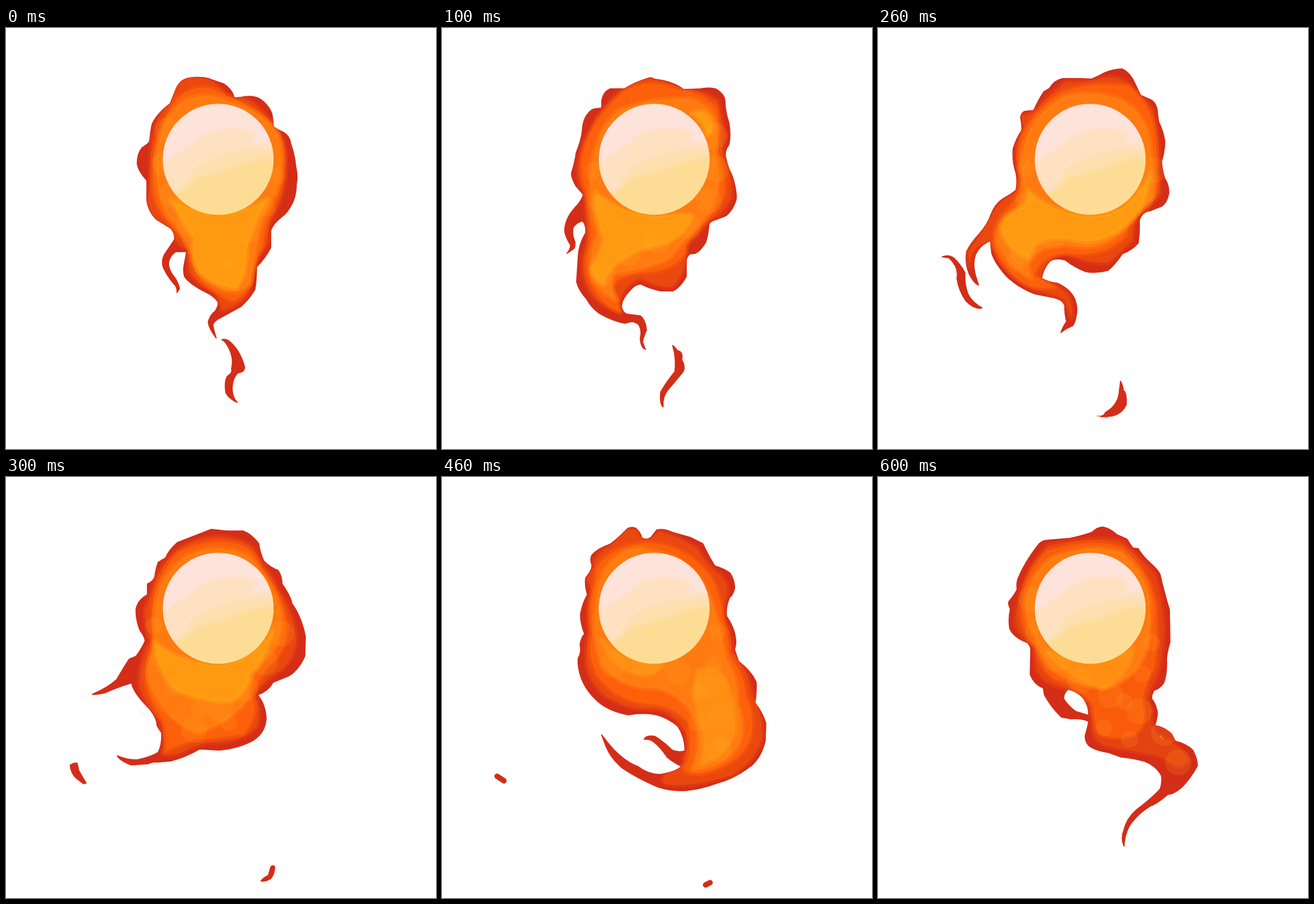
An HTML page without scripts for the animation above (700 ms loop, 757x740 px).

```html
<!DOCTYPE html>
<html lang="en">
<head>
<meta charset="utf-8">
<title>Fireball</title>
<style>
html, body { margin: 0; width: 100%; height: 100%; overflow: hidden; background: #fff; }
svg { display: block; width: 100%; height: 100%; }
path { fill-rule: evenodd; clip-rule: evenodd; }
.pose { visibility: hidden; animation: show .7s step-end calc(var(--i) * .1s) infinite; }
@keyframes show {
  0% { visibility: visible; }
  14.2857%, 100% { visibility: hidden; }
}
.rim { fill: #d42d18; stroke: #d42d18; stroke-width: 1.8; stroke-linejoin: round; }
.ember { fill: none; stroke: #d42d18; stroke-width: 9.5; stroke-linecap: round; }
.heat path { stroke-linejoin: round; stroke-width: 9; stroke-opacity: .4; }
.a { fill: #e9480f; stroke: #e9480f; }
.b { fill: #fd600a; stroke: #fd600a; }
.c { fill: #ff7f12; stroke: #ff7f12; fill-opacity: .9; }
.d { fill: #ffa012; stroke: #ffa012; fill-opacity: .8; }
.late .d { fill: #ff9314; stroke: #ff9314; }
.heat .dab { fill: none; stroke: #ffa520; stroke-width: 46; stroke-linecap: round; stroke-dasharray: 0 58; stroke-opacity: .16; }
.heat .dab + .dab { stroke-width: 30; stroke-dashoffset: 27; }
</style>
</head>
<body>
<svg viewBox="0 0 757 740" preserveAspectRatio="none">
<defs>
  <filter id="soft" x="-20%" y="-20%" width="140%" height="140%"><feGaussianBlur stdDeviation="3"/></filter>
  <clipPath id="disc"><circle cx="373.5" cy="230.7" r="97.5"/></clipPath>

  <path id="o0" d="M299 108Q306 91 322 88Q340 85 357 89L383 98Q398 107 402 123L413 122Q436 117 449 126Q467 140 469 156L471 174Q478 179 488 183Q500 190 501 203Q508 221 510 243Q514 261 511 275Q511 292 505 306Q496 325 484 333Q470 344 466 356L466 386Q456 405 441 420Q441 445 438 460Q427 478 413 490L378 509Q366 515 364 522Q366 533 370 545Q357 528 356 517Q359 505 368 498Q375 488 373 481Q366 471 351 464Q325 451 315 438Q312 432 313 420L318 393L299 393Q287 401 286 414Q286 426 298 440Q306 454 305 459L301 465Q302 455 295 449Q284 436 277 421Q273 410 279 398Q292 379 297 371Q297 360 290 352L264 336Q250 321 248 303L248 268Q233 252 231 238Q231 220 240 210Q251 204 253 198Q254 185 257 170Q264 152 289 133Z"/>
  <path id="o1" d="M363 88Q369 86 374 90Q392 92 408 98Q419 103 425 108Q440 108 455 107Q470 104 482 107Q498 117 498 128Q499 150 505 166Q509 190 505 205Q496 218 500 230Q503 245 511 260Q519 285 518 300Q514 318 500 330L482 337Q471 340 470 345Q468 367 464 377Q455 392 446 396L436 397Q431 402 430 408L430 437Q420 455 407 462L385 462Q365 458 350 450Q342 450 335 457Q316 475 316 490Q318 500 325 503L349 506Q358 512 360 531Q354 545 353 552L358 565Q350 562 349 545Q353 530 345 520Q335 514 330 517L322 519Q300 515 276 501Q262 490 255 477Q240 460 237 446L240 400Q241 380 253 360Q254 345 247 339Q238 341 231 350Q228 362 234 376Q235 388 229 390L220 396Q227 388 226 381Q216 365 216 355Q217 335 233 317Q245 305 249 293L236 278Q227 262 228 255Q235 232 236 220Q246 195 247 180Q248 165 253 156Q262 142 270 142L280 141Q282 138 281 130Q283 112 296 107L321 107Q340 95 363 88Z"/>
  <path id="o2" d="M375 90Q390 84 398 79Q415 72 430 72Q440 76 448 89Q456 105 462 118L482 127Q492 135 492 150L494 165Q502 180 505 200Q504 220 499 235Q500 250 505 265Q512 275 512 290Q510 305 500 313L480 321Q465 322 460 338Q461 360 458 378Q448 390 430 397Q418 415 405 426Q385 432 365 428Q345 420 330 408Q312 403 302 410Q290 425 288 440Q300 447 317 449Q340 460 347 478Q352 492 349 505Q347 518 343 523L331 529L322 535Q326 524 332 516Q328 500 329 488Q325 477 310 474L275 467Q245 455 225 435Q205 412 200 395L198 374Q178 382 171 400Q166 415 172 436L177 452Q168 448 160 431Q153 412 156 393Q163 378 178 362Q193 345 198 330Q205 310 220 300Q235 292 243 285Q246 270 243 255Q236 235 238 212Q243 195 253 180Q254 170 251 158Q252 146 263 146L274 145Q283 125 292 112L302 106Q310 92 325 89L360 89Z"/>
  <path id="o3" d="M361 92L388 95L418 95Q432 100 445 117Q447 133 454 148Q466 160 479 164Q486 175 486 188Q502 211 503 222Q520 245 527 280L526 315Q515 340 497 350L470 361Q462 376 443 383Q457 400 458 425Q456 450 435 463Q410 477 375 480L341 478Q315 493 290 499L267 501Q258 500 250 504L220 506Q200 498 196 490Q215 498 232 497Q255 492 268 484Q275 470 274 450L266 437Q266 425 253 408Q240 395 235 388Q224 375 221 362Q195 370 175 379Q160 383 152 382Q180 370 195 356Q210 330 217 320L229 315Q240 300 245 288Q244 280 236 270Q228 250 229 232Q232 216 249 207L249 188Q260 183 262 175Q264 160 268 150L281 142Q287 128 302 115Q335 102 361 92Z"/>
  <path id="o4" d="M326 91Q333 87 341 90Q349 97 352 107Q359 112 368 106L378 93Q390 90 405 97L437 106L459 117Q470 140 480 156Q500 162 508 170Q516 185 515 196Q512 208 506 212Q499 230 501 245Q515 265 517 285Q518 295 515 303Q519 315 522 324Q545 342 553 360Q554 380 551 397Q565 415 570 433L569 464Q562 492 545 507Q515 530 485 538Q455 549 430 551Q405 553 380 545Q345 530 318 512Q297 495 288 472L281 453Q292 468 303 480Q325 502 345 509Q362 522 382 523Q408 520 422 509Q405 500 396 492Q385 475 372 465Q365 460 356 461Q360 453 375 456Q390 465 405 480Q418 485 428 481Q427 455 415 438Q400 425 378 418Q355 413 328 418Q295 412 275 395Q252 375 244 350Q238 330 240 318Q246 308 243 295Q245 282 251 276Q243 255 244 240Q248 220 256 207Q251 190 253 177Q264 165 264 155Q260 145 264 137Q275 125 296 118Q310 108 326 91Z"/>
  <path id="o5" d="M323 104L366 104Q380 96 397 96Q425 97 447 106Q470 124 490 145L495 159Q506 164 508 178L507 195Q520 210 522 240L526 303Q545 335 583 376Q605 402 615 432L616 462Q610 495 603 507Q580 535 556 555Q525 575 508 600Q497 620 497 632L503 627Q498 640 500 655L510 679Q495 670 485 652Q480 640 483 625Q487 605 502 583Q520 555 527 530Q533 510 532 488Q510 500 497 510Q486 518 486 528L488 545Q479 535 479 520Q482 508 488 500Q488 488 493 475Q500 462 503 452Q495 435 480 428Q465 418 452 417L435 419Q410 416 388 407Q370 411 350 404Q320 392 291 382L285 368Q265 352 260 335Q256 315 262 297Q251 285 248 277L249 266Q242 245 245 228Q250 215 250 205Q256 192 264 180Q273 172 275 155Q283 135 290 128L304 124Q315 117 323 104Z"/>
  <path id="o6" d="M377 97Q385 89 395 88Q408 90 420 101L438 109Q445 120 449 125L458 126Q465 138 478 150Q495 165 497 173Q503 200 513 233L514 290Q508 310 508 322Q509 345 503 362Q496 372 486 375Q481 382 482 390Q491 402 492 416Q490 430 487 437Q505 440 517 452L523 464Q545 470 554 480Q563 497 562 508Q550 530 535 545Q520 558 510 558Q490 575 480 578Q460 590 447 607Q435 622 433 649Q427 635 433 620Q438 600 455 585Q485 562 497 548Q501 535 499 525Q490 508 470 500Q450 494 427 492L405 484Q380 480 370 471Q362 460 366 450Q369 440 371 430Q362 424 340 425L323 422Q305 405 293 383L291 371Q275 365 268 347L269 303Q268 296 263 291Q240 283 232 267Q229 250 233 232Q228 222 231 218Q242 205 245 197Q243 185 248 175Q260 147 283 118Q290 111 300 111L337 108Q360 103 377 97ZM335 373Q326 380 327 390Q335 403 348 412L371 419Q371 400 360 387Q350 377 335 373Z"/>

  <clipPath id="k0"><use href="#o0"/></clipPath>
  <clipPath id="k1"><use href="#o1"/></clipPath>
  <clipPath id="k2"><use href="#o2"/></clipPath>
  <clipPath id="k3"><use href="#o3"/></clipPath>
  <clipPath id="k4"><use href="#o4"/></clipPath>
  <clipPath id="k5"><use href="#o5"/></clipPath>
  <clipPath id="k6"><use href="#o6"/></clipPath>
</defs>

<g class="pose" style="--i:0">
  <use href="#o0" class="rim"/>
  <path class="rim" d="M380 548Q385 546 391 549Q412 565 420 596Q420 605 408 606Q398 616 398 635Q399 650 407 658Q393 652 387 641Q384 620 390 612Q400 606 397 599Q402 580 391 560Q385 549 380 548Z"/>
  <g class="heat" clip-path="url(#k0)">
    <path class="a" d="M299 108Q306 91 322 88Q345 85 365 95Q385 110 390 123Q405 130 413 122Q436 128 455 150L468 168Q487 185 492 215Q496 260 484 300Q475 325 463 345L460 380Q442 400 433 420Q437 450 422 472Q405 492 380 496Q378 485 370 466Q333 448 322 428L320 390Q300 380 298 368L290 352L264 336Q248 315 250 303L254 268Q252 225 259 190Q262 155 289 133Z"/>
    <path class="b" d="M300 125Q340 90 380 115Q420 130 450 155Q483 175 489 220Q491 270 475 305Q458 335 452 385Q437 410 432 440Q425 468 400 480Q372 468 347 448Q323 425 324 390Q312 365 290 345Q258 315 258 270Q254 190 300 125Z"/>
    <path class="c" d="M310 130Q345 110 380 125Q450 140 480 190Q492 240 475 290Q450 330 442 380Q435 420 430 450Q410 470 380 460Q335 440 326 395Q310 360 285 330Q262 290 264 230Q270 160 310 130Z"/>
    <path class="d" d="M290 300Q370 350 460 300Q440 340 425 380Q425 430 405 458Q370 455 340 430Q325 400 330 370Q310 340 290 300Z"/>
    <path class="dab" d="M285 180Q260 290 345 365T405 465"/><path class="dab" d="M480 230Q470 330 420 370T390 450"/>
  </g>
</g>

<g class="pose" style="--i:1">
  <use href="#o1" class="rim"/>
  <path class="rim" d="M406 558Q412 563 414 567Q425 569 422 583Q430 598 423 606Q410 622 397 637Q388 648 389 666Q383 660 385 640Q395 622 410 604Q412 585 409 570Z"/>
  <g class="heat" clip-path="url(#k1)">
    <path class="a" d="M321 107Q345 93 363 88Q392 92 425 108Q460 109 486 128Q493 160 498 190Q490 215 498 235Q513 265 508 300Q498 325 468 340Q448 368 430 382Q433 428 405 455Q380 457 350 440Q310 455 312 497Q282 492 264 468Q243 440 249 400Q260 370 255 340L251 290Q236 270 240 240Q247 200 262 180Q272 152 290 137Q300 120 321 107Z"/>
    <path class="b" d="M320 112Q363 85 415 108Q460 113 483 140Q490 180 486 215Q502 260 497 295Q478 330 453 350Q428 375 428 395Q408 428 355 430Q308 433 300 455Q308 480 314 500Q287 490 268 460Q249 430 255 400Q264 370 260 340L254 290Q241 250 248 220Q264 160 320 112Z"/>
    <path class="c" d="M310 145Q370 120 440 125Q482 140 485 180Q478 220 488 260Q487 310 453 345Q425 375 400 405Q360 425 300 432Q295 460 308 478Q272 465 262 430Q260 390 274 360Q258 320 261 260Q268 180 310 145Z"/>
    <path class="d" d="M270 290Q320 330 380 330Q430 325 440 330Q430 365 390 380Q340 390 330 400Q290 420 285 450Q265 440 262 420Q280 395 285 370Q268 330 270 290ZM440 150Q470 140 475 170Q478 185 468 188Q460 165 440 150Z"/>
    <path class="dab" d="M480 190Q500 330 400 365T275 440"/><path class="dab" d="M265 220Q260 340 330 365T400 400"/>
  </g>
</g>

<g class="pose" style="--i:2">
  <use href="#o2" class="rim"/>
  <path class="rim" d="M113 402Q125 398 133 404Q145 415 153 430Q152 450 158 467Q165 482 183 492Q170 495 155 480Q142 462 139 440Q143 420 125 404ZM427 621Q431 628 432 637Q438 640 437 662Q430 678 412 682L392 683Q400 680 400 676Q420 665 424 645Z"/>
  <path class="rim" opacity=".45" d="M386 682L407 681L404 685Z"/>
  <g class="heat" clip-path="url(#k2)">
    <path class="a" d="M330 95Q375 95 392 88Q430 82 450 107Q465 122 483 142Q491 180 495 215Q490 250 497 285Q492 308 462 318Q447 348 448 372Q425 396 405 412Q370 416 335 398Q300 392 285 440Q320 452 335 470Q345 490 340 510Q335 490 325 475Q300 466 270 458Q227 435 208 395Q195 368 175 385Q160 400 162 420L158 395Q190 350 200 330Q210 305 245 287Q249 260 243 230Q242 200 258 178L252 155L275 148Q300 117 330 95Z"/>
    <path class="b" d="M320 114Q375 93 440 102Q478 130 487 180Q492 220 490 255Q498 288 472 310Q444 338 436 365Q405 400 350 398Q290 390 275 435L310 455Q280 462 257 448Q218 425 205 385Q200 345 222 325Q249 300 252 265Q238 205 267 165Q287 137 320 114Z"/>
    <path class="c" d="M330 120Q380 107 430 127Q473 152 478 200Q487 260 486 296Q455 330 430 355Q395 395 340 383Q290 375 265 410Q265 430 270 440Q227 420 208 375Q212 340 245 318Q260 290 252 240Q257 157 330 120Z"/>
    <path class="d" d="M264 285Q310 330 380 330Q440 330 480 255Q475 320 428 352Q390 384 340 372Q275 360 265 405Q225 390 215 350Q225 325 252 316Q266 305 264 285Z"/>
    <path class="dab" d="M485 250Q460 350 350 360T245 430"/><path class="dab" d="M255 215Q270 300 240 345T265 430"/>
  </g>
</g>

<g class="pose" style="--i:3">
  <use href="#o3" class="rim"/>
  <path class="rim" d="M113 507Q118 502 125 503Q127 510 128 516Q135 528 141 538Q137 541 130 534Q115 525 113 507ZM466 686Q469 681 473 685Q473 697 466 706Q455 712 449 710Q452 705 462 700Z"/>
  <path d="M235 411L245 420M205 386h1" fill="none" stroke="#d42d18" stroke-opacity=".25"/>
  <g class="heat" clip-path="url(#k3)">
    <path class="a" d="M310 122Q355 98 400 108Q435 115 443 140Q468 172 478 197Q508 240 511 285Q508 318 487 337Q457 355 438 380Q450 410 442 438Q420 464 375 466Q340 466 310 484Q290 491 275 487Q283 460 271 430Q238 390 234 360Q236 320 253 290Q244 260 244 235Q257 200 264 180Q277 147 310 122Z"/>
    <path class="b" d="M305 132Q360 104 415 120Q440 132 448 162Q486 202 495 260Q495 308 462 333Q442 360 433 385Q446 420 418 451Q375 461 330 462Q298 474 282 480Q282 450 278 430Q243 380 245 340Q262 300 257 270Q253 220 270 180Q287 147 305 132Z"/>
    <path class="c" d="M315 140Q370 113 425 137Q467 177 485 240Q487 298 453 323Q428 350 428 388Q400 428 340 450Q300 438 272 400Q243 360 252 320Q264 290 262 260Q258 182 315 140Z"/>
    <path class="d" d="M262 290Q300 325 370 330Q430 328 470 270Q455 325 430 345Q425 380 395 395Q340 395 300 375Q265 345 262 290Z"/>
    <path class="dab" d="M485 275Q440 360 400 390T300 470"/><path class="dab" d="M260 230Q255 350 330 400T430 430"/>
  </g>
</g>

<g class="pose late" style="--i:4">
  <use href="#o4" class="rim"/>
  <path class="ember" d="M97 526L109 534M464 717L472 713"/>
  <g class="heat" clip-path="url(#k4)">
    <path class="a" d="M326 92L341 92L354 110L368 108L382 96Q420 105 450 127Q465 152 480 165Q505 180 502 205Q493 230 498 255Q512 280 510 305Q540 340 545 380Q565 420 564 455Q555 498 510 524Q440 546 395 540Q380 530 400 520Q430 510 425 495Q437 470 427 445Q402 407 370 408Q322 410 284 382Q254 353 254 320Q254 290 259 270Q253 235 264 200L256 180L268 155Q265 138 298 120Z"/>
    <path class="b" d="M300 132Q350 106 400 122Q445 138 470 172Q490 200 493 245Q508 290 505 310Q532 345 535 385Q552 420 543 460Q525 505 460 521Q412 525 432 500Q442 470 432 430Q402 398 360 399Q302 391 273 348Q254 310 264 275Q255 230 270 180Q267 152 300 132Z"/>
    <path class="c" d="M312 137Q340 118 368 130Q440 140 472 210Q492 270 500 320Q521 350 520 400Q537 440 520 475Q490 515 440 515Q457 475 447 430Q427 383 380 372Q312 372 282 330Q264 290 270 230Q272 162 312 137Z"/>
    <path class="d" d="M280 285Q320 330 390 328Q380 350 340 345Q300 335 280 285ZM450 340Q490 330 500 360Q520 410 515 450Q497 495 455 505Q468 470 450 410Q440 370 450 340Z"/>
    <path class="dab" d="M300 330Q460 330 480 390T480 500"/><path class="dab" d="M485 240Q490 340 450 380T510 480"/>
  </g>
</g>

<g class="pose late" style="--i:5">
  <use href="#o5" class="rim"/>
  <g class="heat" clip-path="url(#k5)">
    <path class="a" d="M323 108Q395 98 440 111Q475 137 488 162Q503 190 511 220Q513 270 518 310Q548 350 582 387Q604 420 604 455Q601 488 582 512Q550 542 525 570Q510 588 502 600Q522 560 537 530Q542 500 537 470Q507 490 497 493Q502 470 510 455Q490 423 440 400Q390 397 345 387Q298 367 278 328Q265 290 258 270Q249 235 261 200Q277 170 287 142Q310 127 323 108Z"/>
    <path class="b" d="M320 117Q390 98 440 122Q488 157 502 210Q507 270 512 310Q542 355 577 392Q596 430 594 468Q578 516 545 541Q532 551 537 538Q547 500 542 463Q515 468 505 448Q490 418 440 392Q380 387 335 372Q288 343 278 300Q254 250 268 200Q282 142 320 117Z"/>
    <path class="c" d="M315 132Q380 108 440 132Q483 167 492 220Q502 280 502 310Q537 360 571 397Q586 440 575 488Q560 535 542 533Q557 490 552 453Q522 448 500 418Q470 383 430 372Q370 372 330 347Q288 315 275 265Q259 172 315 132Z"/>
    <path class="d" d="M370 335Q440 330 480 260Q505 300 520 340Q530 390 500 410Q460 390 430 370Q380 370 370 335ZM535 390Q575 370 590 410Q600 440 575 450Q540 440 535 390Z"/>
    <path class="dab" d="M340 345Q490 330 530 400T555 520"/><path class="dab" d="M490 270Q480 370 560 400T525 560"/>
  </g>
</g>

<g class="pose late" style="--i:6">
  <use href="#o6" class="rim"/>
  <path d="M497 456L502 461" stroke="#fde4dc" stroke-width="2.5" stroke-linecap="round"/>
  <g class="heat" clip-path="url(#k6)">
    <path class="a" fill-opacity=".8" d="M300 120Q380 103 425 112Q455 134 487 172Q502 220 503 270Q499 338 486 362Q468 385 481 410Q476 440 495 455Q535 472 545 498Q535 515 520 505Q500 490 485 488Q440 480 402 472Q374 462 378 430L371 400Q350 375 320 369Q290 362 279 338L275 300Q245 278 242 250Q249 172 300 120Z"/>
    <path class="b" fill-opacity=".85" d="M300 129Q380 105 430 124Q477 162 488 220Q495 290 485 338Q466 370 465 400Q475 430 455 450Q420 465 390 451Q379 430 379 400Q352 368 312 356Q284 338 279 300Q246 270 253 220Q259 164 300 129Z"/>
    <path class="c" d="M305 142Q370 114 430 133Q472 168 479 220Q484 290 462 328Q438 362 400 371Q342 367 308 338Q279 310 276 280Q255 250 262 210Q269 168 305 142Z"/>
    <path class="d" fill-opacity=".7" d="M290 300Q370 345 450 300Q440 355 395 372Q330 350 290 300Z"/>
    <path class="dab" d="M270 215Q280 330 400 380T530 510"/><path class="dab" d="M485 260Q480 350 420 410T460 460"/>
  </g>
</g>

<g clip-path="url(#disc)">
  <circle cx="373.5" cy="230.7" r="98" fill="#fee3db"/>
  <g filter="url(#soft)">
    <path fill="#fee1c0" d="M270 243Q300 218 322 208Q345 180 385 177Q430 175 441 186Q437 196 430 202L480 202V340H270Z"/>
    <path fill="#fedfae" d="M300 291Q318 278 326 256Q350 228 405 218Q440 212 480 215V340H270Z"/>
    <path fill="#fddd95" d="M270 300Q312 290 335 264Q385 252 425 236Q450 228 480 228V340H270Z"/>
  </g>
</g>
</svg>
</body>
</html>
```
